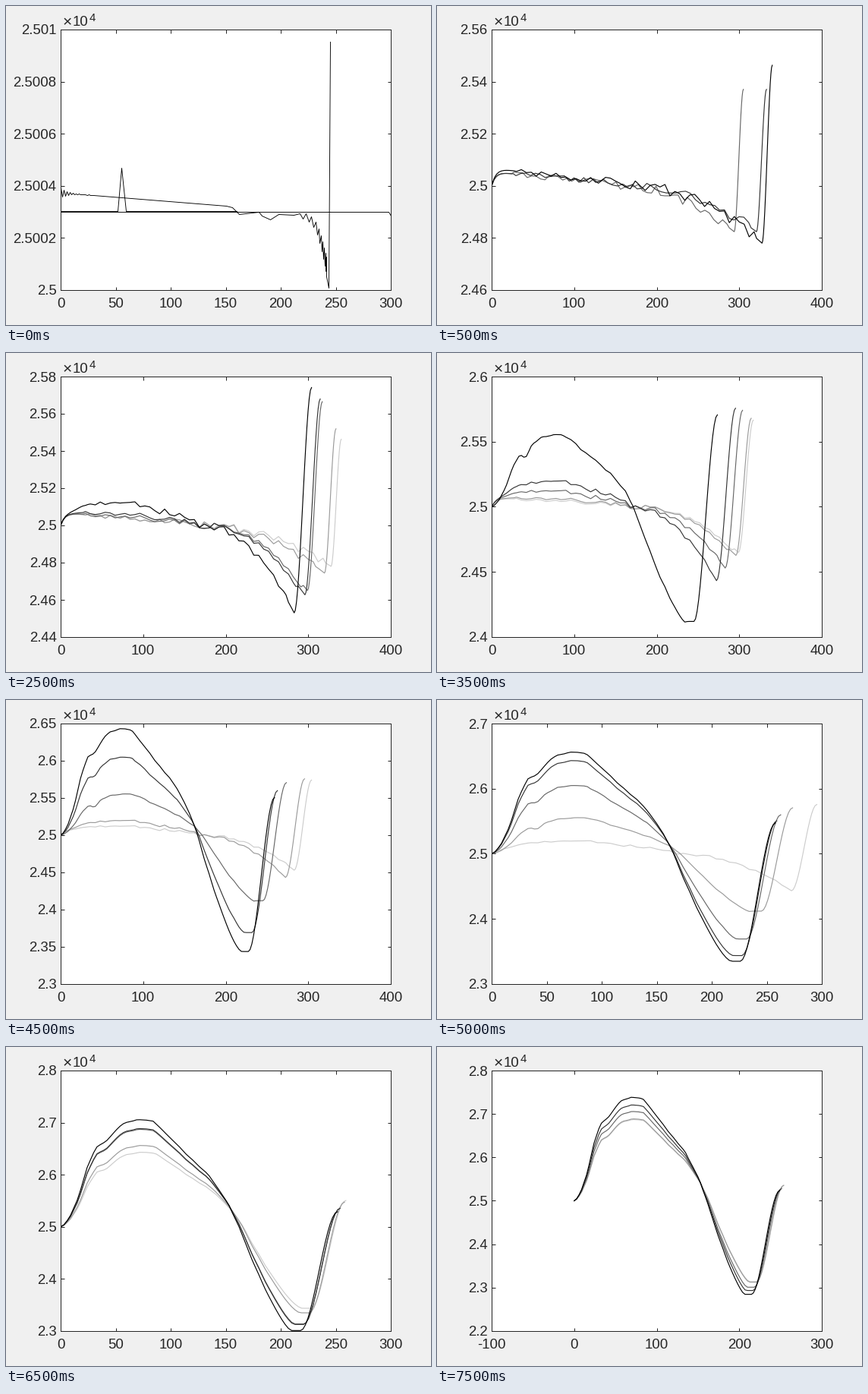
A matplotlib script for the animation above (8000 ms loop, 560 px wide and 420 px high).

```python
import numpy as np
import matplotlib.pyplot as plt
from matplotlib.animation import FuncAnimation
from matplotlib.ticker import FuncFormatter, MultipleLocator

W, H = 560, 420
PX = 0.72  # points per pixel at 100 dpi
INK = "0.15"
BASE = 25000  # all values below are offsets from this

plt.rcParams["font.family"] = "Liberation Sans"

# Each generation is known by its run length; peak, low and end value follow from it.
LENGTHS = [340, 333.6, 317, 314.5, 304, 295.5, 273.5, 262.7, 259.2, 258,
           254, 253.8, 251.6, 250.4, 249]
KEY_LENGTH = [249, 251.6, 258, 262.7, 273.5, 295.5, 304, 317, 340]
KEY_PEAK = [2390, 2063, 1564, 1050, 552, 215, 140, 65, 60]
KEY_LOW = [-2154, -1990, -1650, -1308, -880, -567, -470, -350, -220]
KEY_END = [235, 290, 475, 599, 706, 757, 741, 665, 463]

# Crest of the settled shape, height 1, back to zero at 162.
CREST_X = [0, 3, 8, 16, 24, 32, 40, 50, 58, 70, 84, 95, 115, 136, 153, 162]
CREST_Y = [0, .02, .085, .27, .55, .74, .82, .9, .965, 1, .98, .875, .67, .465, .2, 0]


def curve(length, seed):
    peak, low, end = (np.interp(length, KEY_LENGTH, key)
                      for key in (KEY_PEAK, KEY_LOW, KEY_END))
    climb = length - 34 + 0.24 * (length - 250)
    zero = min(162 + 0.5 * (length - 251.6), 172)
    dive = np.clip((peak - 200) / 350, 0, 1)  # 0: flat glide, 1: full wave

    x = np.append(np.arange(0, climb, 3), climb)
    p = np.minimum(x / zero, 1)
    glide = 65 * (1 - dive)
    up = glide * (1 - np.exp(-x / 5)) * (1 - p ** 1.5)
    up += (peak - glide) * np.interp(p * 162, CREST_X, CREST_Y)
    up -= 60 * dive * np.exp(-((x - 41) / 6) ** 2)

    u = np.clip((x - zero) / (climb - zero), 0, 1)
    steep = 1 - (1 - np.minimum(u / 0.85, 1)) ** 1.3
    down = low * (dive * steep + (1 - dive) * u ** 2)

    knots = np.arange(0, 360, 6)
    noise = np.random.default_rng(seed).uniform(-1, 1, knots.size)
    amp = (9 + x / 16 * (1 - dive)) * ((x > 28) & (x < climb - 8))
    y = up + down + amp * np.interp(x, knots, noise)

    v = np.linspace(0, 1, 16)[1:]
    rise = v * v * (3 - 2 * v)
    return (np.append(x, climb + v * (length - climb)),
            np.append(y, y[-1] + (end - y[-1]) * rise))


curves = {i: curve(n, min((i + 1) // 2, 5)) for i, n in enumerate(LENGTHS, 1)}
for i, n in [(0, 333), (-1, 305)]:  # milder earlier runs
    x, y = curve(340, 10 + i)
    curves[i] = x * n / 340, y * 0.8


def opening():
    """A ringing decay that collapses, two flat lines and one spike."""
    t = np.arange(0, 30, 1.4)
    ring = 3.74 - t * 0.0033 + 0.2 * (-1) ** np.arange(t.size) * np.exp(-t / 6)
    mid_x = [150, 156, 162, 180, 183, 190, 198, 212]
    mid_y = [3.25, 3.19, 2.92, 3.01, 2.87, 2.72, 2.92, 2.88]
    n = np.arange(20)
    fall_x = 244 - 27 * 0.88 ** n
    fall = 2.85 - 2.6 * ((fall_x - 217) / 27) ** 3 + (-1) ** n * (0.1 + 0.013 * n)
    decay = (np.concatenate([t, mid_x, fall_x, [243.5, 244.5]]),
             np.concatenate([ring, mid_y, fall, [0.1, 9.53]]))
    spike = [0, 52, 55.5, 59, 160], [3.02, 3.02, 4.69, 3.02, 3.02]
    flat = [0, 0, 298, 300], [2.6, 2.99, 2.99, 2.86]
    return [spike, flat, decay]


# first step using it, y low, y high, y step, x low, x high, x step
LIMITS = [
    (0, 0, 10, 2, 0, 300, 50),
    (1, -400, 600, 200, 0, 400, 100),
    (3, -400, 800, 200, 0, 400, 100),
    (5, -600, 800, 200, 0, 400, 100),
    (7, -1000, 1000, 500, 0, 400, 100),
    (8, -1500, 1500, 500, 0, 400, 100),
    (9, -2000, 1500, 500, 0, 400, 100),
    (10, -2000, 2000, 1000, 0, 300, 50),
    (13, -2000, 3000, 1000, 0, 300, 50),
    (14, -3000, 3000, 1000, -100, 300, 100),
]

fig = plt.figure(figsize=(5.6, 4.2), dpi=100, facecolor="#f0f0f0")
ax = fig.add_axes([72 / W, 1 - 374 / H, 435 / W, 343 / H])

for x, y, text, size in [(74.5, 27, "×", 21), (88, 26, "10", 18.67), (109.5, 20, "4", 15)]:
    fig.text(x / W, 1 - y / H, text, size=size * PX, color=INK)


def draw(step):
    ax.clear()
    _, y0, y1, dy, x0, x1, dx = [row for row in LIMITS if row[0] <= step][-1]
    ax.set(xlim=(x0, x1), ylim=(y0, y1))
    ax.xaxis.set_major_locator(MultipleLocator(dx))
    ax.yaxis.set_major_locator(MultipleLocator(dy))
    ax.xaxis.set_major_formatter(FuncFormatter(lambda v, _: f"{v:g}"))
    ax.yaxis.set_major_formatter(FuncFormatter(lambda v, _: f"{(BASE + v) / 1e4:g}"))
    ax.tick_params(direction="in", top=True, right=True, length=4.5 * PX, width=PX,
                   color=INK, labelcolor=INK, labelsize=18.67 * PX)
    ax.tick_params(axis="x", pad=10 * PX)
    ax.tick_params(axis="y", pad=5.5 * PX)
    for spine in ax.spines.values():
        spine.set(color=INK, linewidth=PX)

    if step == 0:
        for x, y in opening():
            ax.plot(x, y, color="0", lw=0.9 * PX, snap=True)
        return
    for age in range(4, -1, -1):
        if step - age in curves:
            ax.plot(*curves[step - age], color=str(0.2 * age), lw=1.15 * PX)


anim = FuncAnimation(fig, draw, frames=16, interval=500, repeat=True, repeat_delay=0)
plt.show()
```
